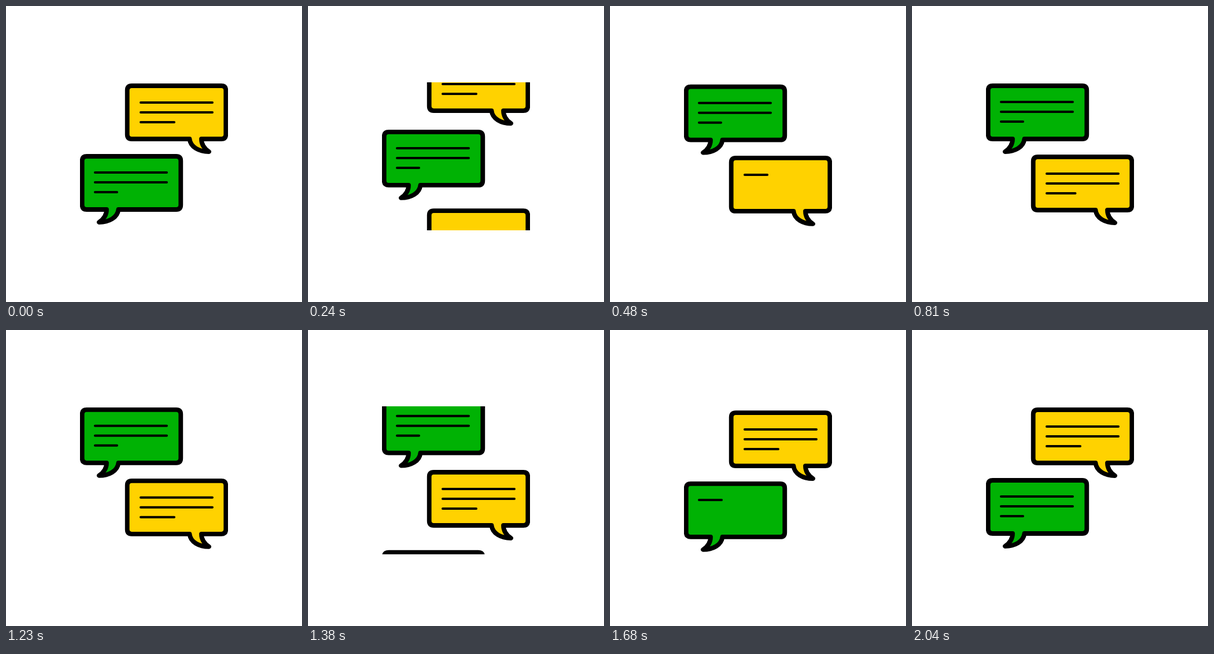
An HTML page with a canvas that plays this animation: 512x512 px, repeating every 2.43 s.

```html
<!DOCTYPE html>
<html lang="en">
<head>
<meta charset="utf-8">
<title>Chat bubbles</title>
<style>
  html, body { margin: 0; width: 100%; height: 100%; overflow: hidden; background: #fff; }
  canvas { display: block; width: 512px; height: 512px; }
</style>
</head>
<body>
<canvas id="stage" width="512" height="512"></canvas>
<script>
const ctx = document.getElementById('stage').getContext('2d');
const LOOP = 2430, STEP = 30, HALF = 1200;

// Outline with its top edge at y = 0; the yellow bubble is its mirror image.
const outline = new Path2D(
  'M194.5 92 H294.5 Q302.3 92 302.3 84 V8 Q302.3 0 294.5 0 ' +
  'H139.5 Q131.7 0 131.7 8 V84 Q131.7 92 139.5 92 H174 ' +
  'C174 100 170 108 161 114 C178 114 193 106 194.5 92 Z');

const green = { fill: '#00b204', left: 154, textTop: 28, lines: [124, 124, 38], low: 260 };
const yellow = { fill: '#ffd200', left: 233, textTop: 29, lines: [124, 124, 58], low: 261, mirror: true };
const HIGH = 138, TRAVEL = 142;

const clamp = x => Math.min(1, Math.max(0, x));

// Cubic Bezier easing (0.6, 0, 0.4, 1)
function ease(x) {
  let lo = 0, hi = 1;
  for (let i = 0; i < 24; i++) {
    const u = (lo + hi) / 2, v = 1 - u;
    if (1.8 * u * v * v + 1.2 * u * u * v + u * u * u < x) lo = u; else hi = u;
  }
  return lo * lo * (3 - 2 * lo);
}

// typed counts finished lines, from 0 to 3
function bubble(b, y, typed = 3) {
  ctx.save();
  ctx.translate(0, y);
  ctx.lineCap = ctx.lineJoin = 'round';
  ctx.strokeStyle = '#000';
  ctx.save();
  if (b.mirror) {
    ctx.translate(512, 0);
    ctx.scale(-1, 1);
  }
  ctx.fillStyle = b.fill;
  ctx.fill(outline);
  ctx.lineWidth = 7.8;
  ctx.stroke(outline);
  ctx.restore();

  ctx.lineWidth = 4;
  b.lines.forEach((length, i) => {
    const part = clamp(typed - i);
    if (!part) return;
    const lineY = b.textTop + 17 * i;
    ctx.beginPath();
    ctx.moveTo(b.left, lineY);
    ctx.lineTo(b.left + length * part, lineY);
    ctx.stroke();
  });
  ctx.restore();
}

function draw(t) {
  const first = t < HALF;
  const time = first ? t : t - HALF;
  const [leaving, staying, duration] = first ? [yellow, green, 531] : [green, yellow, 580];
  const p = ease(clamp((time - 9) / duration));

  ctx.fillStyle = '#fff';
  ctx.fillRect(0, 0, 512, 512);
  ctx.save();
  ctx.beginPath();
  ctx.rect(128, 132, 256, 256);
  ctx.clip();
  // The bubble that leaves at the top comes back empty from below.
  if (p < 1) bubble(leaving, HIGH - TRAVEL * p);
  if (p > 0) bubble(leaving, leaving.low + TRAVEL * (1 - p), 3 * clamp((time - 439) / 390));
  bubble(staying, staying.low + (HIGH - staying.low) * p);
  ctx.restore();
}

const start = performance.now();
function frame() {
  const t = (performance.now() - start) % LOOP;
  draw(Math.floor(t / STEP) * STEP);
  requestAnimationFrame(frame);
}
frame();
</script>
</body>
</html>
```
